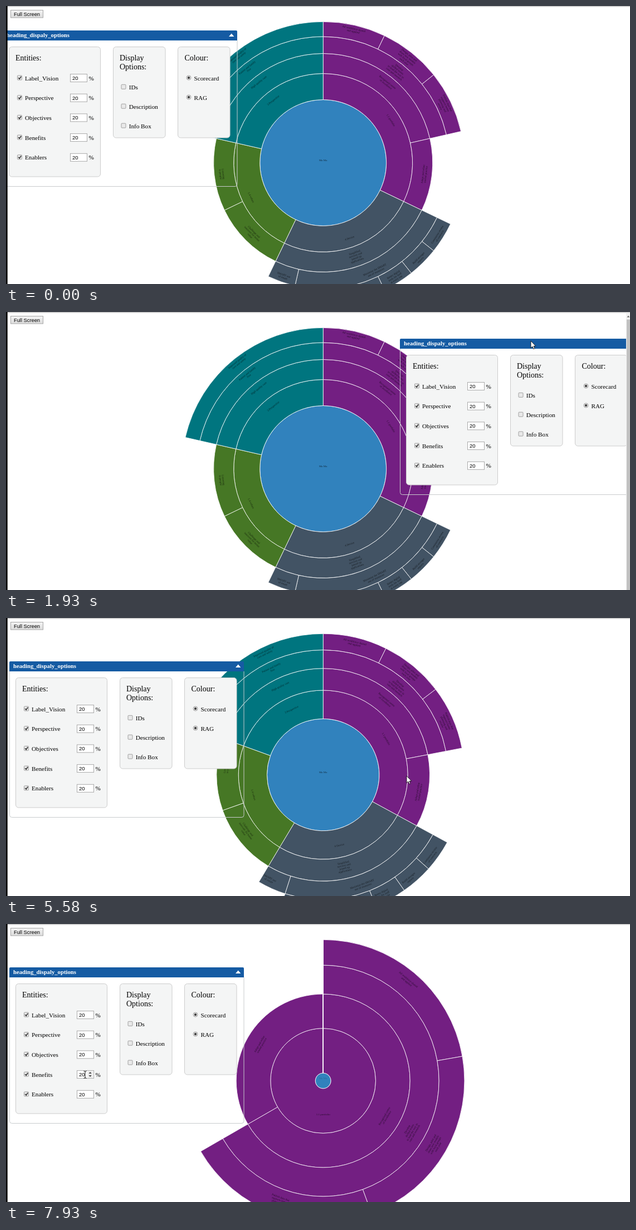
These frames come from a looping animation (1120x500 px, 8 s). An HTML page:

```html
<!DOCTYPE html>
<html lang="en">
<head>
<meta charset="utf-8">
<title>Sunburst options</title>
<style>
html, body { margin: 0; width: 100%; height: 100%; overflow: hidden; background: #fff; }
svg { display: block; }
.ui { font: 11.2px "Liberation Serif", Times, serif; }
.h { font-size: 14px; }
.head { font-size: 10.7px; font-weight: bold; fill: #fff; }
.sans { font: 9.5px "Liberation Sans", Arial, sans-serif; }
.arc { stroke: #fff; stroke-width: .8; }
.tiny { font: 5px "Liberation Serif", Times, serif; text-anchor: middle; }
</style>
</head>
<body>
<svg width="1120" height="500" viewBox="0 0 1120 500">
  <defs>
    <linearGradient id="btn" x2="0" y2="1"><stop stop-color="#f4f4f4"/><stop offset="1" stop-color="#dcdcdc"/></linearGradient>
  </defs>
  <rect width="1120" height="1.5" fill="#c6c6c6"/>
  <g class="sans">
    <rect x="8.5" y="7.5" width="58" height="13.5" fill="url(#btn)" stroke="#a6a6a6"/>
    <text x="14" y="18" font-size="9.3">Full Screen</text>
  </g>
  <g transform="translate(569.2 282)"><g id="arcs" class="arc"></g><g id="labels" class="tiny"></g></g>
  <g id="panel" class="ui"></g>
  <g id="scroll">
    <rect x="1113" y="1.5" width="7" height="499" fill="#f1f1f1"/>
    <path d="M1114.5 9.5l2.5-3 2.5 3z" fill="#666"/>
    <rect x="1114" y="13.5" width="6" height="487" fill="#c1c1c1"/>
  </g>
  <rect width="2.7" height="500"/>
  <path id="arrow" d="M0 0V12.6L2.9 10 4.9 14.6 6.9 13.7 5 9.3H8.8Z" fill="#fff" stroke="#000" stroke-width=".8"/>
  <path id="beam" d="M-2.5-6.5Q0-6.5 0-5Q0-6.5 2.5-6.5M0-5V5M-2.5 6.5Q0 6.5 0 5Q0 6.5 2.5 6.5" fill="none" stroke="#111"/>
</svg>
<script>
const $ = id => document.getElementById(id);
const LOOP = 8000, R = 253.75, HOLE = 14, TAU = Math.PI * 2;

// a node holds its children, or its size if it is a leaf
const node = (label, ...kids) => typeof kids[0] === 'number'
  ? { label, kids: [], size: kids[0] }
  : { label, kids, size: kids.reduce((sum, k) => sum + k.size, 0) };

const plum = node('1.1 portfolio',
  node('Recognised centre|of excellence',
    node('Develop|skilled teams|to lead the way in|care and research',
      node('All workforce shared|and applied', 2),
      node('Design, pilot and|share new models|with local groups|each year', 2),
      node('Publish data that|supports better|planning and|review', 2))),
  node('Adopt and refine|trusted practice', 3));
const slate = node('4 Device',
  node('Simplified|services and|joined up|applications',
    node('Maximise the SMART|use of resources',
      ...['Continuous review|of contracts', 'Build stronger|reports', 'Better digital|tools for staff|at every site',
        'Reduce paper use|and storage', 'Shared|records', 'Quicker|access'].map(s => node(s, 1))),
    node('SMART use|of estate', 1)));
const green = node('1.4 values',
  node('Challenge and|innovate for better|value', 3),
  node('Listening|to people', 3));
const teal = node('3 Perspective',
  node('High quality care',
    node('Patient and family|first',
      node('Improved quality of|care and safety', 6))));
plum.color = '#731f82';
slate.color = '#425364';
green.color = '#467725';
teal.color = '#00757f';
const root = node('Ma Ma', plum, slate, green, teal);
root.color = '#3182bd';

const nodes = [];
(function layout(n, a, depth, color) {
  Object.assign(n, { a, b: a + n.size, depth, color: n.color || color, lines: n.label.split('|') });
  nodes.push(n);
  for (const k of n.kids) {
    layout(k, a, depth + 1, n.color);
    a += k.size;
  }
})(root, 0, 0);

// progress of a move, held between screen captures
function held(t, from, to) {
  const n = Math.round((to - from) / 76);
  return Math.min(1, Math.floor((t - from) / (to - from) * n + 1e-6) / n);
}

// pointer moves: from, to (ms), x, y
const moves = [[133, 1000, 234, 53], [1000, 1230, 229, 48], [1325, 1550, 589, 40.5], [1550, 1930, 942, 52],
  [2184, 2640, 267, 90], [2724, 2870, 241, 82], [3182, 3490, 185, 108], [3490, 4100, 631, 298],
  [4665, 4890, 731, 282], [4975, 5120, 719, 284], [6133, 6440, 345, 291], [6540, 6950, 115, 270],
  [6950, 7360, 142, 238], [7690, 7930, 142, 271]];
const GRAB = 1230, DROP = 2870, ZOOM = 5420, ZOOM_END = 6202, ZOOM_MS = 750;

function pointer(t) {
  let x = 995, y = 498;
  for (const [from, to, toX, toY] of moves) {
    if (t < from) break;
    const p = held(t, from, to);
    x += (toX - x) * p;
    y += (toY - y) * p;
  }
  return [x, y];
}

function cubicInOut(p) {
  p = Math.min(1, Math.max(0, p));
  return p < .5 ? 4 * p ** 3 : 1 - 4 * (1 - p) ** 3;
}

// scales for zoom progress u: angle from units, radius from depth
function scales(u) {
  const span = root.size + (plum.size - root.size) * u, low = Math.sqrt(.2 * u), r0 = HOLE * u;
  return {
    angle: x => Math.min(1, x / span) * TAU,
    radius: d => Math.max(0, r0 + (R - r0) * (Math.sqrt(d / 5) - low) / (1 - low))
  };
}

const at = (a, r) => `${(r * Math.sin(a)).toFixed(2)} ${(-r * Math.cos(a)).toFixed(2)}`;
function arc(a0, a1, r0, r1) {
  a1 = Math.min(a1, a0 + TAU - 1e-3);
  const big = +(a1 - a0 > Math.PI);
  return `M${at(a0, r0)}L${at(a0, r1)}A${r1} ${r1} 0 ${big} 1 ${at(a1, r1)}` +
    `L${at(a1, r0)}A${r0} ${r0} 0 ${big} 0 ${at(a0, r0)}Z`;
}

$('arcs').innerHTML = nodes.map(n => `<${n.depth ? 'path' : 'circle'} fill="${n.color}"/>`).join('');
$('labels').innerHTML = nodes.map(n => '<text>' + n.lines.map((s, i) =>
  `<tspan x="0" y="${(i - (n.lines.length - 1) / 2) * 5 + 1.5}">${s}</tspan>`).join('') + '</text>').join('');
nodes.forEach((n, i) => {
  n.shape = $('arcs').children[i];
  n.text = $('labels').children[i];
});

function drawChart(t) {
  const p = t < ZOOM ? 0 : held(t, ZOOM, ZOOM_END) * (ZOOM_END - ZOOM) / ZOOM_MS;
  const u = cubicInOut(p), { angle, radius } = scales(u);
  const ahead = scales(cubicInOut(p && p + .033)); // labels run slightly early
  for (const n of nodes) {
    const d = n.depth;
    if (n === root) {
      n.shape.setAttribute('r', radius(1));
      n.text.setAttribute('transform', 'translate(0 -5)');
      n.text.setAttribute('opacity', .65 - .45 * u);
      continue;
    }
    n.shape.setAttribute('d', arc(angle(n.a), angle(n.b), radius(d), radius(d + 1)));
    const deg = ahead.angle((n.a + n.b) / 2) * 360 / TAU;
    const r = (ahead.radius(d) + ahead.radius(d + 1)) / 2 + Math.max(0, 4 - n.lines.length) * 2.2;
    const flip = deg > 90 && deg < 270 ? 180 : 0;
    n.text.setAttribute('transform', `rotate(${deg}) translate(0 ${-r}) rotate(${flip})`);
    n.text.setAttribute('opacity', n.b <= plum.b ? .65 : .65 * (1 - u));
  }
}

// options panel
const text = (x, y, s, cls = '') => `<text x="${x}" y="${Math.round(y)}" class="${cls}">${s}</text>`;
const card = (x, w, h) => `<rect x="${x}" y="29.5" width="${w}" height="${h}" rx="5" fill="#f4f5f5" stroke="#ccc"/>`;
const check = (x, y, on) =>
  `<rect x="${x}" y="${y - 4}" width="8" height="8" rx="1" fill="#e9e9e9" stroke="#a0a0a0"/>` +
  (on ? `<path d="M${x + 1.7} ${y}l2 2.2 3-4.6" fill="none" stroke="#333" stroke-width="1.6"/>` : '');
const radio = (x, y) =>
  `<circle cx="${x}" cy="${y}" r="4" fill="#e9e9e9" stroke="#a0a0a0"/><circle cx="${x}" cy="${y}" r="2.2" fill="#444"/>`;
const rowY = i => 85.5 + i * 35.7;
const entity = (name, i) => {
  const y = rowY(i);
  return check(26.5, y - .5, true) + text(40, y + 4, name) +
    `<rect x="121.5" y="${y - 7}" width="30" height="14" fill="#fff" stroke="#aaa"/>` +
    text(125, y + 3.5, '20', 'sans') + text(154.5, y + 4, '%');
};
$('panel').innerHTML =
  '<path d="M.5 18V276.5q0 4 4 4H417q4 0 4-4V18" fill="none" stroke="#c8cbcd"/>' +
  '<path d="M0 18V2q0-2 2-2H419q2 0 2 2V18z" fill="#155ba3"/>' +
  '<path d="M406 11l4.7-5.5 4.7 5.5z" fill="#fff"/>' +
  text(7, 12, 'heading_dispaly_options', 'head') +
  card(11.5, 164, 233.5) + card(198.5, 93.5, 163.5) + card(314.5, 93.5, 163.5) +
  text(23, 54, 'Entities:', 'h') + text(210, 54, 'Display', 'h') + text(210, 70, 'Options:', 'h') +
  text(326.5, 54, 'Colour:', 'h') +
  ['Label_Vision', 'Perspective', 'Objectives', 'Benefits', 'Enablers'].map(entity).join('') +
  ['IDs', 'Description', 'Info Box'].map((s, i) =>
    check(213, 101.3 + i * 34.9, false) + text(226.7, 106 + i * 35, s)).join('') +
  ['Scorecard', 'RAG'].map((s, i) => radio(334, 85 + i * 35) + text(343.5, 89.5 + i * 35, s)).join('') +
  '<g id="spin"><rect x="140.5" y="-6" width="9.5" height="12" fill="#ececec"/>' +
  '<path d="M142.5-1.7l2.6-3 2.6 3zM142.5 1.3l2.6 3 2.6-3z" fill="#444"/></g>';

const show = (id, on) => $(id).setAttribute('visibility', on ? 'visible' : 'hidden');
const place = (id, x, y) => $(id).setAttribute('transform', `translate(${x} ${y})`);

function draw(t) {
  drawChart(t);
  const [x, y] = pointer(t);
  const [gx, gy] = pointer(Math.min(DROP, Math.max(GRAB, t)));
  const left = Math.round(gx - 235);
  place('panel', left, Math.round(gy - 4.3));
  show('scroll', left + 421 > 1120);

  const typing = t >= 7280;
  place('arrow', x, y);
  place('beam', x, y);
  place('spin', 0, rowY(y < 255 ? 2 : 3));
  show('arrow', t >= 210 && !typing);
  show('beam', typing);
  show('spin', typing);
}

const start = performance.now();
function tick() {
  draw((performance.now() - start) % LOOP);
  requestAnimationFrame(tick);
}
tick();
</script>
</body>
</html>
```
